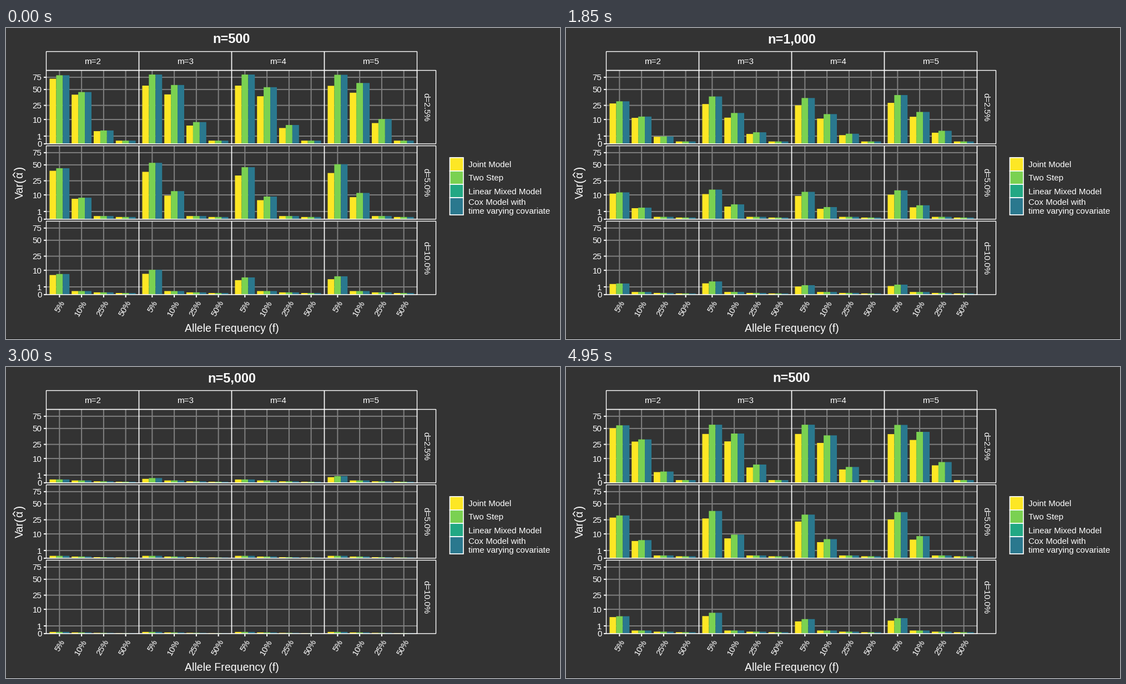
These frames come from a looping animation (998 px wide and 561 px high, 5000 ms). A matplotlib script:

```python
import numpy as np
import matplotlib.pyplot as plt
from matplotlib.animation import FuncAnimation
from matplotlib.patches import Rectangle

W, H = 998, 561
BG, GRID = "#333333", "#7f7f7f"
YELLOW, GREEN, TEAL, BLUE = "#fde725", "#7ad151", "#22a884", "#2a788e"

X0, PANEL_W = 72.5, 167
Y0, PANEL_H, PITCH = 76.5, 132.4, 136
UNIT = PANEL_W / 4.2      # width of one category
BAR_W = 0.3 * UNIT
ROOT = 13.86              # pixels per unit of square root
TICKS = (0, 1, 10, 25, 50, 75)
FREQS = (5, 10, 25, 50)
RATES = ("2.5%", "5.0%", "10.0%")
SIZES = (500, 1000, 2500, 5000, 10000)

M_SHIFT = np.array([0.25, -0.05, 0.05, -0.15])  # by number of measurements
N_SHIFT = (0, 0.03, 2.2, 3, 4)                  # by sample size
FLOOR = (18, 18, 8.9, 6, 4)


def heights(shift, floor):
    """Bar heights in pixels, indexed by d, m, f and model.

    Every doubling of d or f moves a bar down one falling cosine curve,
    until it meets a floor that shrinks with their square root.
    """
    d = np.arange(3)[:, None, None]
    m = np.arange(4)[None, :, None]
    f = np.log2(np.array(FREQS) / 5)[None, None, :]
    z = f + 1.15 * d + shift + M_SHIFT[m] + 0.08 * d * (m - 1.5)
    two_step = 125 * np.cos(np.pi / 2 * np.clip(z / 3.35, -1, 1)) ** 1.6
    joint = two_step * np.where(m == 0, 0.95, 0.84)
    low = floor * 2 ** (-(d + f) / 2)
    return np.stack([np.maximum(joint, low), np.maximum(two_step, low)], axis=3)


STATES = [heights(s, lo) for s, lo in zip(N_SHIFT, FLOOR)]

plt.rcParams["font.family"] = "Liberation Sans"
plt.rcParams["path.snap"] = False
# 72 dpi makes one point equal one pixel
fig = plt.figure(figsize=(W / 72, H / 72), dpi=72, facecolor=BG)
ax = fig.add_axes([0, 0, 1, 1])
ax.set(xlim=(0, W), ylim=(H, 0))
ax.axis("off")


def text(x, y, s, size=15.1, ha="left", rot=0, **kw):
    return ax.text(x, y, s, fontsize=size, color="white", ha=ha, va="baseline",
                   rotation=rot, rotation_mode="anchor", **kw)


def box(x, y, w, h, lw=1.4, face="none"):
    ax.add_patch(Rectangle((x, y), w, h, fc=face, ec="white", lw=lw, zorder=3))


bars = []
tick_x = [X0 + PANEL_W * m + UNIT * (f + 0.6) for m in range(4) for f in range(4)]
right = X0 + 4 * PANEL_W
for d, rate in enumerate(RATES):
    top = Y0 + PITCH * d
    base = top + PANEL_H
    levels = [base - ROOT * v ** 0.5 for v in TICKS]
    ax.hlines(levels, X0, right, color=GRID, lw=2, zorder=1)
    ax.vlines(tick_x, top, base, color=GRID, lw=2, zorder=1)
    ax.hlines(levels, X0 - 4.5, X0, color="white", lw=2, zorder=3)
    for v, y in zip(TICKS, levels):
        text(64.5, y + 5.5, str(v), ha="right")
    for m in range(4):
        box(X0 + PANEL_W * m, top, PANEL_W, PANEL_H)
        for f in range(4):
            left = tick_x[4 * m + f] - 1.5 * BAR_W
            for j, color in enumerate((YELLOW, GREEN, BLUE)):
                bar = Rectangle((left + j * BAR_W, base), BAR_W, 0,
                                fc=color, lw=0, zorder=2, snap=True)
                ax.add_patch(bar)
                bars.append((bar, (d, m, f, min(j, 1))))
    box(right, top, 34, PANEL_H)
    text(752.3, top + PANEL_H / 2, "d=" + rate, ha="center", rot=-90)

for m in range(4):
    box(X0 + PANEL_W * m, 42.5, PANEL_W, 34)
    text(X0 + PANEL_W * (m + 0.5), 65, f"m={m + 2}", ha="center")
ax.vlines(tick_x, 481.5, 486, color="white", lw=2, zorder=3)
for i, x in enumerate(tick_x):
    text(x + 9.5, 494.8, f"{FREQS[i % 4]}%", ha="right", rot=60)

# Axis titles
text(406.5, 547.5, "Allele Frequency (f)", 19.5, ha="center")
for y, s, size in ((308, "Var", 19.5), (278.5, "(", 22), (270.5, "α", 19.5), (257, ")", 22)):
    text(30.5, y, s, size, rot=90)
ax.plot([16, 12.5, 16], [269, 265, 261], color="white", lw=1.5)

# Legend
for i, color in enumerate((YELLOW, GREEN, TEAL, BLUE)):
    box(799.5, 233.8 + 24.1 * i, 24.4, 31 if color == BLUE else 24.1, 1.7, color)
for y, s in ((251, "Joint Model"), (275.3, "Two Step"), (299.5, "Linear Mixed Model"),
             (318.5, "Cox Model with"), (335, "time varying covariate")):
    text(833, y, s)

ax.hlines(560.5, 0, W, color="#1c1c1c", lw=1)
title = text(406.5, 27, "", 23.5, ha="center", weight="bold")


def update(k):
    """Hold each sample size for 15 steps, then slide to the next one."""
    state, step = divmod(k, 20)
    after = (state + 1) % 5
    p = max(0, step - 14) / 6
    now = STATES[state] * (1 - p) + STATES[after] * p
    for bar, spot in bars:
        bar.set_height(-now[spot])
    title.set_text(f"n={SIZES[after if p > 0.51 else state]:,}")
    return [title]


anim = FuncAnimation(fig, update, frames=100, interval=50, repeat=True,
                     repeat_delay=0, blit=False)
plt.show()
```
